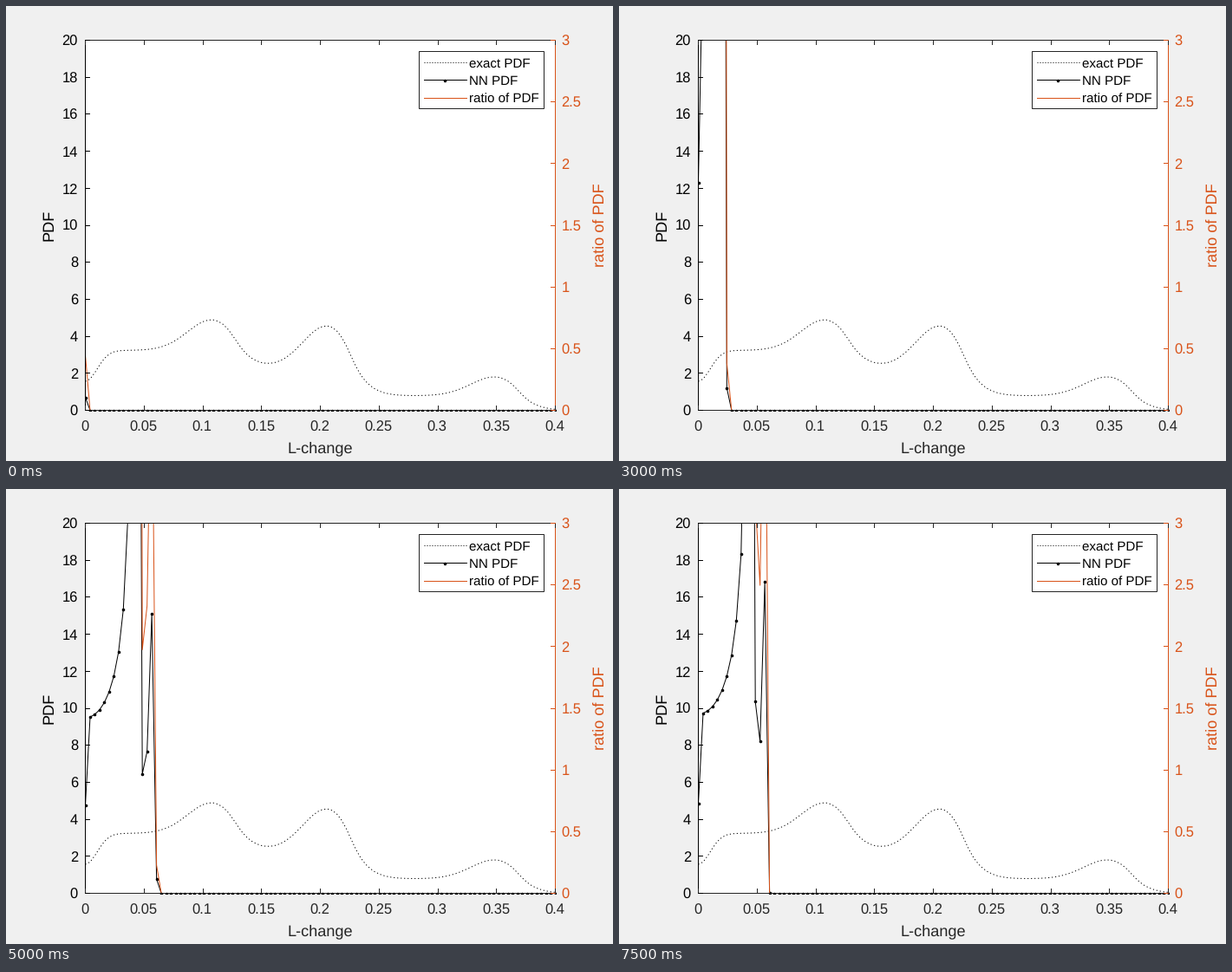
A matplotlib script that plays this animation: 700 by 525 pixels, repeating every 8 s.

```python
import numpy as np
import matplotlib.pyplot as plt
from matplotlib.animation import FuncAnimation
from matplotlib.patches import Rectangle

plt.rcParams["font.family"] = "Liberation Sans"
plt.rcParams["text.hinting"] = "none"

W, H, DPI = 700, 525, 100
PT = 72 / DPI                       # points per pixel
L, R, T, B = 91.5, 633.5, 39.5, 466.5
DARK, ORANGE = "#262626", "#d95319"
STEPS, BINS = 16, 100

fig = plt.figure(figsize=(W / DPI, H / DPI), dpi=DPI, facecolor="#f0f0f0")
ax = fig.add_axes([0, 0, 1, 1])
ax.set(xlim=(0, W), ylim=(H, 0))
ax.axis("off")


def px(x):
    return L + np.asarray(x) / 0.4 * (R - L)


def py(y, top):
    return B - np.asarray(y) / top * (B - T)


def line(x, y, color, z, **kw):
    return ax.plot(x, y, color=color, lw=PT, zorder=z, **kw)[0]


def rule(x, y, color, z=5, **kw):
    """Straight line through pixel centres."""
    return line(np.floor(x) + 0.5, np.floor(y) + 0.5, color, z, snap=False,
                **kw)


def label(x, y, s, size, color, ha="center", rot=0):
    ax.text(x, y, s, fontsize=size * PT, color=color, ha=ha, va="baseline",
            rotation=rot, rotation_mode="anchor", zorder=8)


def hermite(x, xs, ys):
    """Smooth curve through a few knots."""
    xs, ys = np.array(xs, float), np.array(ys, float)
    m = np.gradient(ys, xs)
    i = np.clip(np.searchsorted(xs, x, side="right") - 1, 0, len(xs) - 2)
    h = xs[i + 1] - xs[i]
    t = (x - xs[i]) / h
    return ((1 + 2 * t) * (1 - t) ** 2 * ys[i] + t * (1 - t) ** 2 * h * m[i]
            + t * t * (3 - 2 * t) * ys[i + 1] + t * t * (t - 1) * h * m[i + 1])


def exact_pdf(x):
    """Three humps, each a bump on a shelf that ends just behind it."""
    x = x * 1000
    y = -1.68 * np.exp(-(x / 14) ** 2)
    for c, bump, shelf in ((108, 1.67, 0.95), (206, 2.3, 1.5),
                           (349, 1.03, 0.79)):
        y += bump * np.exp(-((x - c) / 29.4) ** 2)
        y += shelf / (1 + np.exp((x - c - 19.5) / 5))
    return y


grid = np.linspace(0, 0.4, BINS)
exact = exact_pdf(grid)

# right end of the estimated density, in bins
reach = hermite(np.arange(STEPS),
                [0, 2, 4, 5, 6, 8, 9, 10, 11, 13, 15],
                [0.2, 0.45, 2.4, 3.45, 5.503, 11.6, 13.501, 14.503, 14.52,
                 14.502, 14.5])


def estimate(n):
    """Histogram of an arcsine head, a narrow fold and a square-root tail."""
    edges = np.clip(np.arange(BINS + 1) - 0.5, 0, None)
    u = edges / reach[n]
    split = 0.643 + 0.0061 * n
    fold = np.interp(n, [6, 9, 15], [0.87, 0.745, 0.775])
    head, tail = 132 + 2 * n, 37
    v = np.clip((u - split) / (1 - split), 0, 1)
    cdf = (head * np.arcsin(np.minimum(u / split, 1)) / (np.pi / 2)
           + tail * (0.78 * (1 - np.sqrt(1 - v)) + 0.22 * v)
           + (250 - head - tail) / (1 + np.exp((fold - u) / 0.007)))
    return np.diff(cdf) * min(1, 0.0028 + 0.5 * n)


# axes box, ticks and labels
ax.add_patch(Rectangle((L, T), R - L, B - T, fc="white", ec="none", zorder=0))
rule([L, R], [T, T], DARK)
rule([L, R], [B, B], DARK)
rule([L, L], [T, B], "black")
rule([R, R], [T, B], ORANGE)
for v in np.arange(9) * 0.05:
    x = px(v)
    rule([x, x], [B, B - 5], DARK)
    rule([x, x], [T, T + 5], DARK)
    label(x - 0.8, 491, f"{v:g}", 16.5, DARK)
for v in range(0, 21, 2):
    y = py(v, 20)
    rule([L, L + 5], [y, y], "black")
    label(83, y + 6.3, str(v), 16.5, "black", "right")
for v in np.arange(7) * 0.5:
    y = py(v, 3)
    rule([R - 5, R], [y, y], ORANGE)
    label(640.5, y + 6.3, f"{v:g}", 16.5, ORANGE, "left")
label(362.5, 515, "L-change", 18.2, DARK)
label(55, 253, "PDF", 18.2, "black", rot=90)
label(689.5, 253, "ratio of PDF", 18.2, ORANGE, rot=90)

# curves
DOT = dict(marker="o", ms=3.6 * PT, mew=0)
clip = Rectangle((91, 39), 543, 428, transform=ax.transData)
dotted = line(px(grid), py(exact, 20), "black", 2, ls=(0, (1.2, 2.8)))
est = line([], [], "black", 3, **DOT)
ratio = line([], [], ORANGE, 4)
for art in (dotted, est, ratio):
    art.set_clip_path(clip)

# legend
ax.add_patch(Rectangle((476.5, 52.5), 144, 66, fc="white", ec=DARK, lw=PT,
                       zorder=6, snap=False))
rule([482, 531], [65, 65], "black", 7, ls=(0, (1, 2)))
rule([482, 531], [85, 85], "black", 7)
line([506], [85.5], "black", 7, **DOT)
rule([482, 531], [106, 106], ORANGE, 7)
for y, s in ((71, "exact PDF"), (91, "NN PDF"), (112, "ratio of PDF")):
    label(534.5, y, s, 15.1, "black", "left")


def update(n):
    y = estimate(n)
    est.set_data(px(grid), py(y, 20))
    ratio.set_data(px(grid), py(y / exact, 3))
    return est, ratio


anim = FuncAnimation(fig, update, frames=STEPS, interval=500,
                     repeat=True, repeat_delay=0)
plt.show()
```
